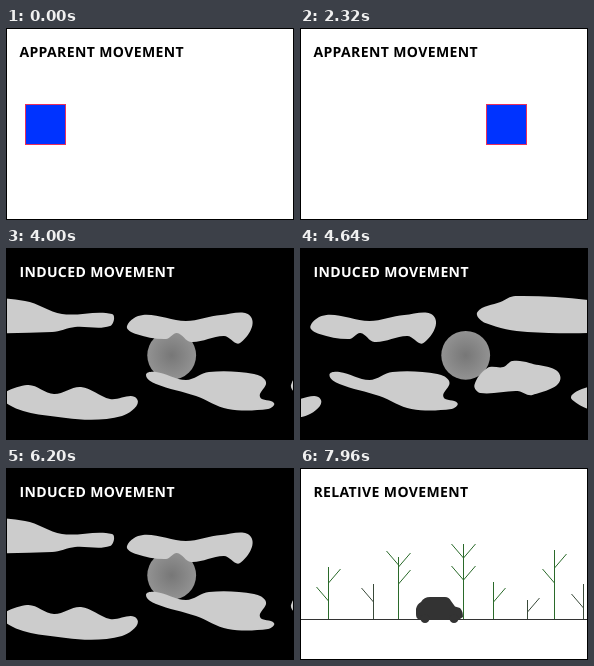
Recreate the animation shown at these times as an HTML page. Size 288x192 px, loop 8 s.

```html
<!DOCTYPE html>
<html lang="en">
<head>
<meta charset="utf-8">
<title>Kinds of movement</title>
<style>
  html, body { margin: 0; width: 100%; height: 100%; overflow: hidden; background: #fff; }
  svg { display: block; width: 100vw; height: 100vh; }
  text { font: bold 14px "Open Sans", "Noto Sans", sans-serif; letter-spacing: .38px; text-rendering: geometricPrecision; }
  .scene { visibility: hidden; }
  #clouds { fill: #ccc; }
  #trees { fill: none; }
</style>
</head>
<body>
<svg viewBox="0 0 288 192">
  <defs>
    <radialGradient id="moonlight">
      <stop offset="0" stop-color="#777"/>
      <stop offset="1" stop-color="#929292"/>
    </radialGradient>
  </defs>
  <rect width="288" height="192" fill="#fff"/>

  <g id="apparent" class="scene">
    <text x="13.4" y="29">APPARENT MOVEMENT</text>
    <rect id="square" x=".5" y="76.5" width="40" height="40" fill="#03f" stroke="#e8305c"/>
  </g>

  <g id="induced" class="scene">
    <rect width="288" height="192"/>
    <circle cx="165.7" cy="107.3" r="24.4" fill="url(#moonlight)"/>
    <g id="clouds"></g>
    <text x="13.4" y="29" fill="#fff">INDUCED MOVEMENT</text>
  </g>

  <g id="relative" class="scene">
    <text x="13.4" y="29">RELATIVE MOVEMENT</text>
    <g id="trees"></g>
    <path d="M0 151.5H288" stroke="#333"/>
    <g fill="#333">
      <path d="M116 141Q117 136 121 134Q124 129 130 129H145Q149 129 151 133L155 138.5L160 140Q163 143 163 149L160 151H118Q116 150 116 146Z"/>
      <circle cx="125" cy="150.5" r="4.5"/>
      <circle cx="154" cy="150.5" r="4.5"/>
    </g>
  </g>

  <rect x=".5" y=".5" width="287" height="191" fill="none" stroke="#000"/>
</svg>
<script>
const LOOP = 8000, TICK = 40;
const CLOUD_STRIP = 387, TREE_STRIP = 315, GROUND = 151;
const $ = id => document.getElementById(id);

function addPath(parent, d, x, stroke = 'none') {
  const path = document.createElementNS('http://www.w3.org/2000/svg', 'path');
  path.setAttribute('d', d);
  path.setAttribute('stroke', stroke);
  path.setAttribute('transform', `translate(${x})`);
  parent.append(path);
}

// Smooth closed curve through a few points, "x,y x,y ..."
function blob(text) {
  const pts = text.split(' ').map(p => p.split(',').map(Number));
  const at = i => pts[(i + pts.length) % pts.length];
  const handle = (i, reach) => {
    const [x, y] = at(i), [ax, ay] = at(i - 1), [bx, by] = at(i + 1);
    const scale = reach / Math.hypot(bx - ax, by - ay);
    return [x + (bx - ax) * scale, y + (by - ay) * scale];
  };
  return 'M' + pts[0] + pts.map(([x, y], i) => {
    const next = at(i + 1), reach = Math.hypot(next[0] - x, next[1] - y) / 3;
    return `C${handle(i, reach)} ${handle(i + 1, -reach)} ${next}`;
  }).join('') + 'Z';
}

const clouds = [
  '-99,64 -76,54 -61,48 19,53 56,66 106,66 104,78 69,79 46,84 -49,84 -91,75',
  '121,78 137,67 180,73 215,67 245,69 234,95 218,88 185,94 171,85 160,91 130,86',
  '-4,152 21,137 48,146 75,139 104,151 131,151 116,168 60,170',
  '140,127 150,124 180,132 203,124 248,126 260,134 254,149 268,155 262,161 222,161 190,148 150,136',
  '-102,137 -89,120 -73,119 -64,113 -47,115 -16,129 -44,147 -59,143 -96,145'
];
for (const outline of clouds)
  for (const x of [0, CLOUD_STRIP]) addPath($('clouds'), blob(outline), x);

// A trunk with equal twigs; a negative fork height points left
function tree(x, height, ...forks) {
  const twigs = forks.map(f => `M0 ${GROUND - Math.abs(f)}l${12 * Math.sign(f)} -14`);
  const d = `M0 ${GROUND}v${-height}` + twigs.join('');
  for (const start of [x, x - TREE_STRIP])
    addPath($('trees'), d, start + .5, height < 36 ? '#3a4a3a' : '#2a6a2a');
}
tree(28, 52, 36, -18);
tree(73, 35, -17);
tree(98, 62, -54, 52, 35);
tree(163, 75, 61, -61, 39, -39);
tree(193, 37, 17);
tree(227, 19, 7);
tree(254, 69, 51, -36);
tree(283, 35, -11);

// The square's places, and its runs as start, end, time per stop
const stops = [19, 61, 102, 143, 186];
const runs = [[0, 1000, 200], [1240, 2440, 120], [2640, 3440, 40]];

const show = (id, on) => { $(id).style.visibility = on ? 'visible' : 'hidden'; };
const slide = (id, x) => $(id).setAttribute('transform', `translate(${x})`);
const ticksSince = (t, start) => Math.floor((t - start) / TICK);

function draw(t) {
  const run = runs.find(([start, end]) => t >= start && t < end);
  show('apparent', t < 3440);
  show('square', run);
  if (run) slide('square', stops[Math.floor((t - run[0]) / run[2]) % stops.length]);

  show('induced', t >= 3560 && t < 7000);
  slide('clouds', (11 - ticksSince(t, 3560) % 55) * CLOUD_STRIP / 56);

  show('relative', t >= 7160);
  slide('trees', (20 - Math.max(1, ticksSince(t, 7160))) * 7);
}

const began = performance.now();
function frame() {
  draw((performance.now() - began) % LOOP);
  requestAnimationFrame(frame);
}
frame();
</script>
</body>
</html>
```
